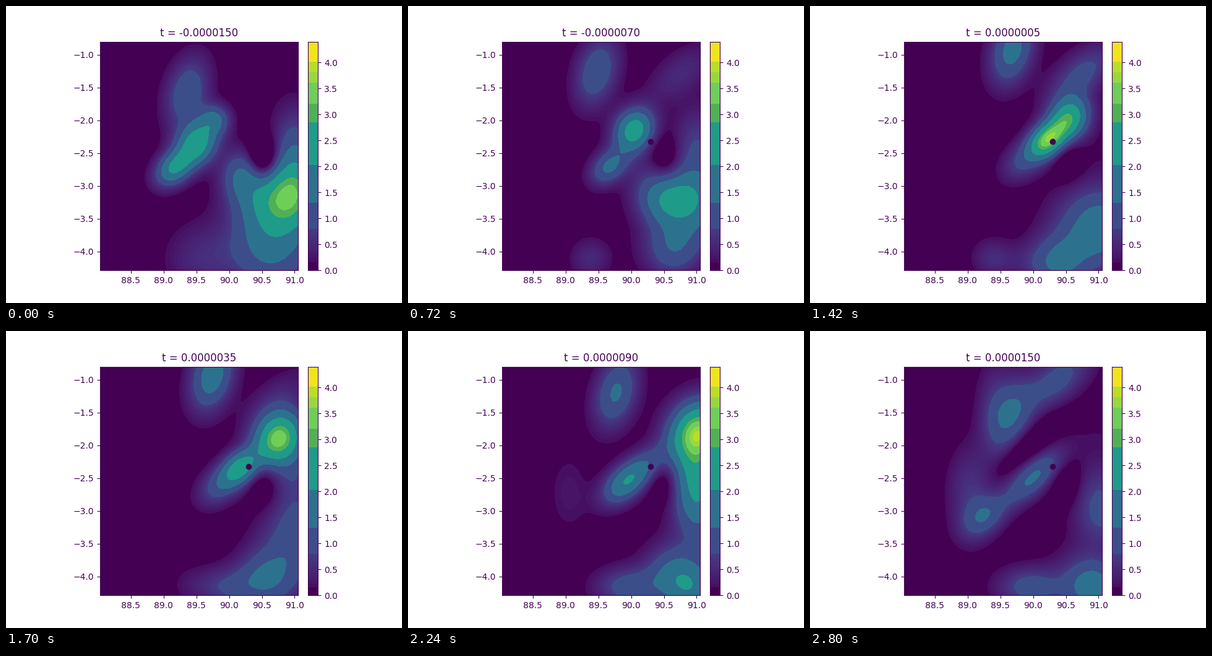
Recreate the animation shown at these times as a matplotlib script. Size 640 by 480 pixels, loop 2820 ms.

```python
import matplotlib.pyplot as plt
import numpy as np
from matplotlib.animation import FuncAnimation
from matplotlib.colors import BoundaryNorm, ListedColormap

INK = "#440154"
STEPS = 61
X0, X1, Y0, Y1 = 88.030, 91.054, -4.289, -0.802
LEFT, TOP, WIDE, HIGH = 152.2, 57.6, 320, 369.6

px, py = np.meshgrid(LEFT + np.arange(320) + 0.5,
                     TOP + (np.arange(370) + 0.5) * HIGH / 370)


def ramp(k, start, end):
    """Smooth step from 0 to 1."""
    u = np.clip((k - start) / (end - start), 0, 1)
    return u * u * (3 - 2 * u)


def pulse(k, peak, width):
    return np.exp(-((k - peak) / width) ** 2 / 2)


def blob(height, x, y, long, short=None, tilt=90):
    """Tilted Gaussian; position and sigmas in stage pixels."""
    c, s = np.cos(np.radians(tilt)), np.sin(np.radians(tilt))
    dx, dy = px - x, py - y
    u, v = (dx * c - dy * s) / long, (dx * s + dy * c) / (short or long)
    return height * np.exp(-(u * u + v * v) / 2)


def core(k):
    """Filament crossing to the right edge, with the ridge it leaves behind."""
    run = min(k, 45)
    size = 21 + 9 * ramp(k, 31, 43)
    lead = 2.5 * (1 - ramp(k, 46, 62)) + 1.75 * pulse(k, 43, 5)
    z = blob(lead, 309 + 3.55 * run, 222 - 1.3 * run, 1.2 * size, size, 60)
    z += blob(1.3 * pulse(k, 0, 5), 338, 184, 17)

    back = max(k - 31, 0)
    trail = 1.4 + 0.7 * pulse(k, 0, 5) + 1.8 * pulse(k, 31, 5)
    z += blob(trail, 272 + 112 * ramp(k, 2, 31) - 0.8 * back,
              262 - 45 * ramp(k, 14, 31) + 0.7 * back,
              24 + 18 * ramp(k, 40, 53), 17, 43)

    slip = ramp(k, 50, 60)
    z += blob(ramp(k, 22, 34), 345 - 63 * slip, 250 + 50 * slip, 28, 19, 42)
    z += blob(0.65 * ramp(k, 43, 55), 260, 262, 50, 25)
    return z


def upper(k):
    """Swaying patch at the top and the band in the top right corner."""
    z = blob(1.2 + 0.5 * pulse(k, 37, 8), 315 - 22 * np.cos(np.pi * k / 45),
             105 + 35 * np.cos(np.pi * k / 33), 40, 23, 75)
    late = ramp(k, 53, 60)
    band = 0.7 * pulse(k, 24, 10) + 0.4 * pulse(k, 31, 4) + late
    z += blob(band, 440 - 40 * late, 110 - 30 * late, 45, 23, 40)
    z += blob(0.5 * late, 298, 125, 55, 20)
    z -= blob(0.5 * late, 355, 183, 45, 14, 42)
    return z


def flank(k):
    """Plateau at the right edge, fading, sinking and rising again."""
    start = pulse(k, 0, 7)
    z = blob(0.9 + 0.7 * start + 1.25 * pulse(k, 26, 6),
             470, 290 + 70 * pulse(k, 29, 9), 44, 30 + 16 * pulse(k, 31, 5))
    z += blob(0.7 * (1 - ramp(k, 20, 31)) + 1.9 * pulse(k, 46, 6),
              466, 215 + 0.5 * k, 42, 24)
    z += blob(2.05 * (1 - ramp(k, 14, 32)), 437 - k, 313,
              42 - 0.6 * k, 37 - 0.5 * k, 0)
    z += blob(1.3 * (1 - ramp(k, -8, 26)), 380, 273, 28, 22)
    z -= blob(0.4 + 0.9 * start, 416, 248, 24, 17)
    return z


def bottom(k):
    start, dip = pulse(k, 0, 6), pulse(k, 31, 4)
    z = blob(1.2 - 0.9 * ramp(k, 46, 58) + 0.25 * start,
             428 - 25 * dip, 390 + 25 * dip, 32 + 15 * start)
    z += blob(1.65 * ramp(k, 34, 52), 460, 417, 30)
    z += blob(0.5 * (1 - ramp(k, 31, 40)), 295 + 20 * start, 408, 22 + 16 * start)
    z += blob(1.05 * ramp(k, 25, 43), 357, 414, 36, 22, 0)
    return z


def field(k):
    return np.clip(core(k) + upper(k) + flank(k) + bottom(k), 0, 4.39)


# fine steps at the low end, broad bands above
low = np.r_[0, np.linspace(0.16, 0.8, 13)]
bounds = np.r_[low, 1.3, 2.02, 2.84, 3.2, 3.6, 3.8, 4.0, 4.4]
viridis = plt.get_cmap("viridis")
colors = [INK] + [viridis(m / 4.4) for m in (low[1:-1] + low[2:]) / 2]
colors += [viridis(0.24), viridis(0.375), viridis(0.55), "#50b055",
           "#6ece58", "#98d83e", "#b8de29", "#f0e51c"]
style = dict(cmap=ListedColormap(colors), norm=BoundaryNorm(bounds, len(colors)),
             aspect="auto", interpolation="nearest")

plt.rcParams.update({
    "font.family": "DejaVu Sans", "text.color": INK, "axes.edgecolor": INK,
    "xtick.color": INK, "ytick.color": INK, "axes.titlecolor": INK,
})
fig = plt.figure(figsize=(6.4, 4.8), dpi=100)
ax = fig.add_axes([LEFT / 640, 0.11, WIDE / 640, 0.77])
cax = fig.add_axes([488 / 640, 0.11, 16.5 / 640, 0.77])

cax.imshow(np.linspace(0, 4.39, 740)[:, None], origin="lower",
           extent=(0, 1, 0, 4.4), **style)
cax.set_xticks([])
cax.set_yticks(np.arange(0, 4.1, 0.5))
cax.yaxis.tick_right()
cax.yaxis.set_major_formatter("{x:.1f}")

frames = [field(k) for k in range(STEPS)]
image = ax.imshow(frames[0], extent=(X0, X1, Y0, Y1), **style)
ax.plot(90.299, -2.327, "o", color=INK)
ax.set_xlim(X0, X1)
ax.set_ylim(Y0, Y1)
ax.set_xticks(np.arange(88.5, 91.1, 0.5))
ax.set_yticks(np.arange(-4, -0.9, 0.5))
title = ax.set_title("")

# every third step is held for five ticks of 20 ms
order = np.repeat(np.arange(STEPS), [5 if k % 3 == 1 else 1 for k in range(STEPS)])


def update(i):
    k = order[i]
    image.set_data(frames[k])
    title.set_text(f"t = {(5 * k - 150) / 1e7:.7f}")
    return image, title


anim = FuncAnimation(fig, update, frames=len(order), interval=20,
                     repeat=True, repeat_delay=0, blit=False)
plt.show()
```
